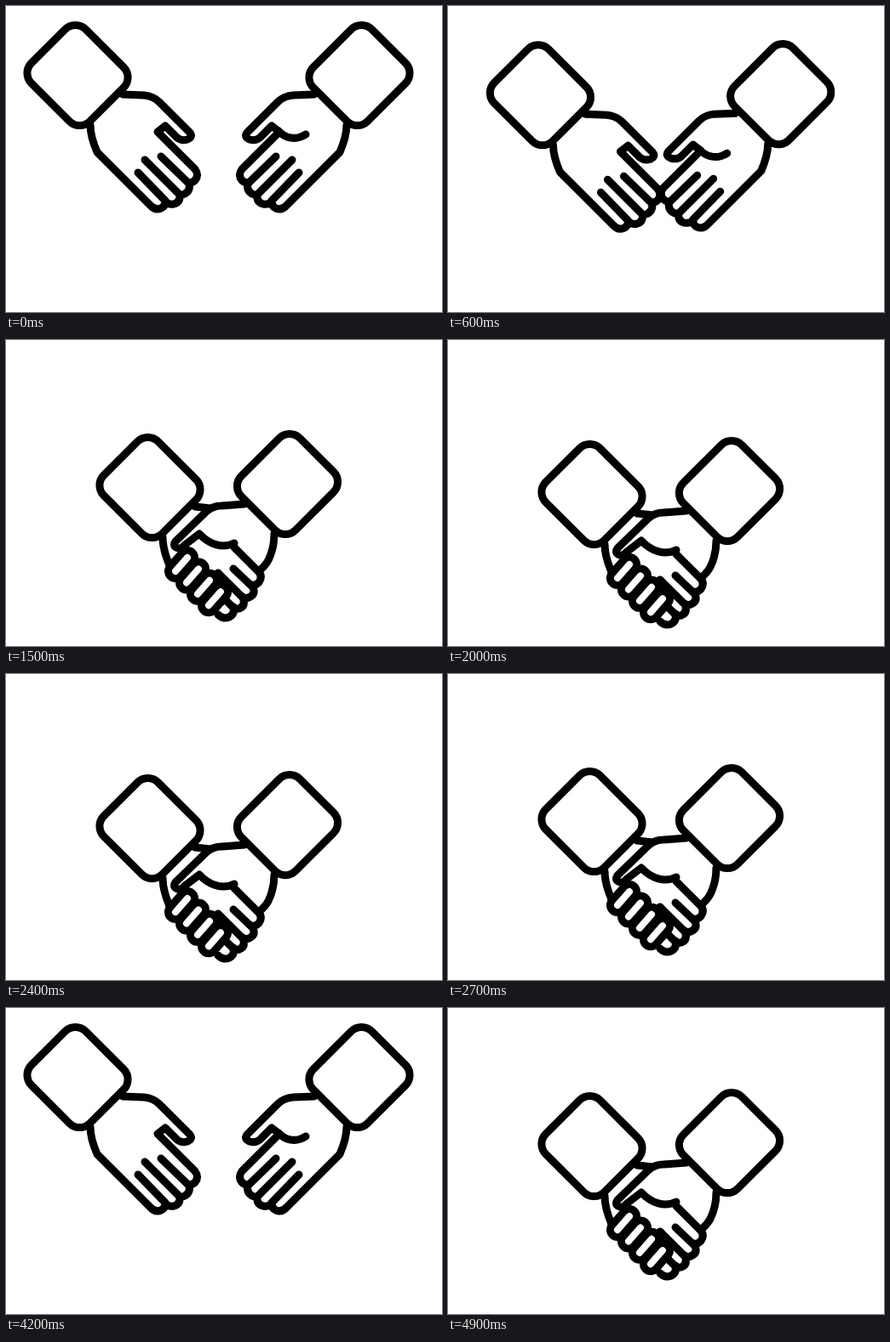
Recreate the animation shown at these times as an HTML page. Size 512x360 px, loop 5 s.

```html
<!DOCTYPE html>
<html lang="en">
<head>
<meta charset="utf-8">
<title>Handshake</title>
<style>
  html, body { margin: 0; height: 100%; overflow: hidden; background: #fff; }
  svg { display: block; width: 100%; height: 100%; }
  .ink { fill: #fff; stroke: #000; stroke-width: 9; stroke-linecap: round; stroke-linejoin: round; }
  .line { fill: none; }
</style>
</head>
<body>
<svg viewBox="0 0 512 360" class="ink">
  <defs>
    <rect id="cuff" x="-48.5" y="-45" width="97" height="90" rx="17" transform="translate(84 81.5) rotate(45)"/>
    <g id="hand">
      <path d="M99 140C99 152 104 165 107 172L169 234Q175 241 182 238Q187 236 187 230
        Q191 234 197 233Q205 231 204 222Q206 223 210 221Q217 217 215 208
        Q219 208 222 205Q227 199 222 192L178 148L187 141L201 155Q206 159 213 157
        Q220 154 216 149L180 113Q173 106 162 105L137 104"/>
      <path class="line" d="M155 196L187 229M163 181L204 222M182 177L215 209"/>
    </g>
    <path id="palm" class="line" d="M179 147C172 155 159 159 147 151"/>
  </defs>

  <g id="open">
    <use id="leftHand" href="#hand"/>
    <g id="rightHand"><g transform="translate(499) scale(-1 1)">
      <use href="#hand"/><use href="#palm"/>
    </g></g>
  </g>

  <g id="clasp" class="line">
    <path d="M184 221C184 232 189 247 192 254M222 185L240 187"/>
    <path d="M280 182L253 184Q243 184 235 191L199 226Q195 232 202 234Q206 235 210 230
      L227 217C238 229 254 235 268 228M315 217C315 228 312 240 308 248Q305 254 298 260"/>
    <g id="leftFingers">
      <path d="M268 233L296 261Q302 267 297 274Q293 278 289 277Q294 287 287 291Q282 294 278 291
        Q282 302 274 305Q270 306 267 303Q269 312 262 315Q255 318 249 312"/>
      <path d="M267 258L289 279M249 263L277 291M254 291L267 304"/>
    </g>
    <g id="rightFingers"></g>
  </g>

  <g id="leftCuff"><use href="#cuff"/></g>
  <g id="rightCuff"><use href="#cuff" transform="translate(499) scale(-1 1)"/></g>
</svg>
<script>
  const $ = id => document.getElementById(id);
  const move = (id, x, y) => $(id).setAttribute('transform', `translate(${x} ${y})`);
  const show = (id, on) => $(id).setAttribute('visibility', on ? 'visible' : 'hidden');

  // Folded fingers: wide black strokes, then narrow white ones on top
  const folded = [0, 1, 2, 3].map(i => `M${213 + 13 * i} ${245 + 13.4 * i}l-14 16`).join('');
  $('rightFingers').innerHTML =
    `<path d="${folded}" stroke-width="26"/><path d="${folded}" stroke="#fff" stroke-width="8"/>`;

  // Smooth step from 0 to 1 between two times
  function ease(t, from, to) {
    const k = Math.min(1, Math.max(0, (t - from) / (to - from)));
    return k * k * (3 - 2 * k);
  }

  function draw(t) {
    const near = ease(t, 430, 910) - ease(t, 2850, 3450) + ease(t, 4330, 4810);
    const shaking = t > 1000 && t < 2800;
    const dip = shaking ? 22 * Math.abs(Math.sin(Math.PI * (t - 1000) / 600)) : 0;
    const joined = near > 0.9;

    for (const part of ['Hand', 'Cuff']) {
      move('left' + part, 85 * near, 81 * near + dip);
      move('right' + part, -84.5 * near, 77 * near + dip);
    }
    const loose = near < 1;
    move('leftFingers', loose ? 2 : 0, loose ? 3 : 0);
    move('clasp', 0, dip);
    show('open', !joined);
    show('clasp', joined);
  }

  function tick() {
    // Ten poses per second
    draw(Math.floor(performance.now() % 5000 / 100) * 100);
    requestAnimationFrame(tick);
  }
  tick();
</script>
</body>
</html>
```
